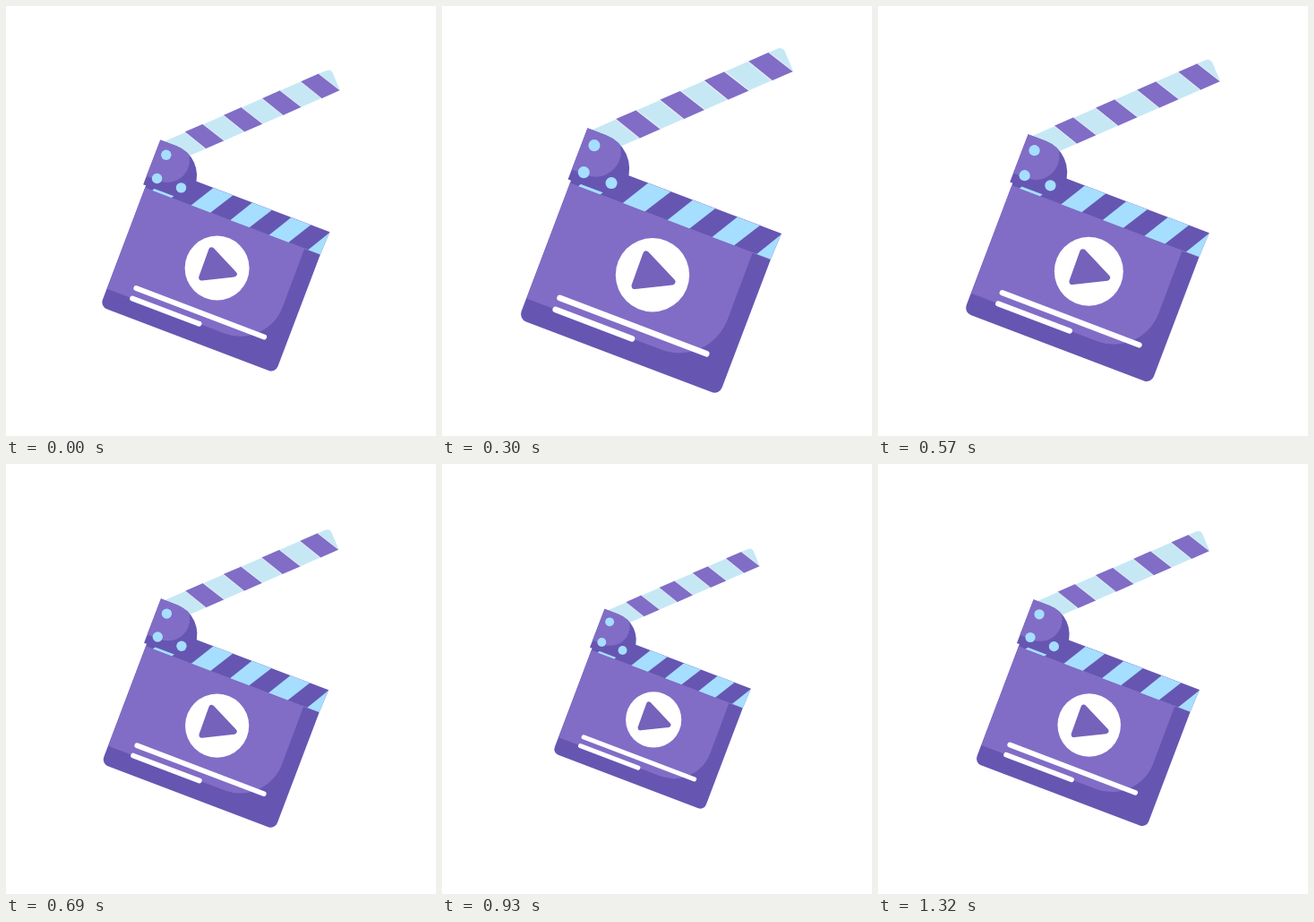
Animation of 480 by 480 pixels, one loop 1.35 s. Source, as an HTML page with a canvas:

```html
<!DOCTYPE html>
<html lang="en">
<head>
<meta charset="utf-8">
<title>Clapperboard</title>
<style>
html, body { margin: 0; width: 100%; height: 100%; overflow: hidden; background: #fff; }
canvas { display: block; width: 480px; height: 480px; }
</style>
</head>
<body>
<canvas id="stage" width="480" height="480"></canvas>
<script>
const ctx = document.getElementById('stage').getContext('2d');
const LOOP = 1350, STEP = 30;
const DRAWN_SCALE = 1.137; // the coordinates below are laid out at this scale
const PURPLE = '#816dc6', DARK = '#6656b2', BLUE = '#a6deff', PALE = '#c6e8f5';
const SLOPE = 0.38;

function fill(color) {
  ctx.fillStyle = color;
  ctx.fill();
}

// Each point is [x, y] or [x, y, cornerRadius].
function trace(points) {
  ctx.beginPath();
  points.forEach(([x, y, r], i) => {
    if (!r) return ctx.lineTo(x, y);
    const [nx, ny] = points[(i + 1) % points.length];
    ctx.arcTo(x, y, nx, ny, r);
  });
  ctx.closePath();
}

function shape(color, points) {
  trace(points);
  fill(color);
}

function disc(color, x, y, r) {
  ctx.beginPath();
  ctx.arc(x, y, r, 0, Math.PI * 2);
  fill(color);
}

function line(color, width, x1, y1, x2, y2) {
  ctx.strokeStyle = color;
  ctx.lineWidth = width;
  ctx.beginPath();
  ctx.moveTo(x1, y1);
  ctx.lineTo(x2, y2);
  ctx.stroke();
}

function drawArm() {
  shape(PALE, [[168, 139], [364, 53.1], [379.5, 46.5, 6], [391, 74], [190, 161.5]]);
  for (let i = 0; i < 4; i++) {
    const x = 49 * i, y = -21.3 * i;
    shape(PURPLE, [[194 + x, 127 + y], [217 + x, 117 + y], [244 + x, 138 + y], [220.5 + x, 148.3 + y]]);
    line('rgba(255,255,255,.8)', 1, 194 + x, 127 + y, 220.5 + x, 148.3 + y);
    line('rgba(255,255,255,.8)', 1, 217 + x, 117 + y, 244 + x, 138 + y);
  }
}

function drawStrip() {
  const top = x => 254 + (x - 378) * SLOPE;
  const bottom = x => 198 + (x - 143.5) * SLOPE;
  const strip = [[154.5, 169], [378, 254], [366, 282.7], [143.5, 198]];
  shape(DARK, strip);
  ctx.save();
  trace(strip);
  ctx.clip();
  for (let i = -1; i < 4; i++) {
    const t = 230.3 + 49.4 * i, b = 202 + 49.5 * i;
    shape(BLUE, [[t, top(t)], [t + 25, top(t + 25)], [b + 24.5, bottom(b + 24.5)], [b, bottom(b)]]);
  }
  ctx.restore();
}

function drawHinge() {
  const plate = [[163, 137], [221, 159, 40], [202, 209], [196, 214.5], [141.3, 193.7]];
  shape(DARK, plate);
  ctx.save();
  trace(plate);
  ctx.clip();
  ctx.beginPath();
  ctx.moveTo(163, 130);
  ctx.lineTo(140, 181);
  ctx.lineTo(162, 189.2);
  ctx.arc(172, 163, 28, 1.935, -0.35, true);
  ctx.lineTo(205, 130);
  fill(PURPLE);
  ctx.restore();
  disc(BLUE, 170.4, 156.2, 6.5);
  disc(BLUE, 158.8, 186, 6.5);
  disc(BLUE, 189.4, 197.8, 6.5);
}

function drawBoard() {
  shape(DARK, [[143.5, 198], [366, 282.7], [309, 433, 9], [86.5, 348.5, 9]]);
  shape(PURPLE, [[143.5, 198], [346, 275], [298, 403, 57], [95.5, 326]]);
}

function drawPlay() {
  disc('#fff', 235, 299.8, 40.9);
  const color = '#7562bb';
  shape(color, [[228, 277], [256.5, 307.3], [215.5, 311.8]]);
  ctx.strokeStyle = color;
  ctx.lineWidth = 7.5;
  ctx.stroke();
}

function draw(ms) {
  const scale = 1 + 0.147 * Math.sin(ms / LOOP * Math.PI * 2);
  ctx.setTransform(1, 0, 0, 1, 0, 0);
  ctx.fillStyle = '#fff';
  ctx.fillRect(0, 0, 480, 480);
  ctx.translate(240, 240);
  ctx.scale(scale / DRAWN_SCALE, scale / DRAWN_SCALE);
  ctx.translate(-240, -240);
  ctx.lineJoin = 'round';

  ctx.lineCap = 'butt';
  drawArm();
  drawBoard();
  drawStrip();
  drawHinge();
  drawPlay();
  ctx.lineCap = 'round';
  line('#fff', 6.6, 132.3, 325.3, 294.8, 387.2);
  line('#fff', 6.6, 127.5, 338.3, 212.2, 370.4);
}

const start = performance.now();
function tick() {
  const ms = (performance.now() - start) % LOOP;
  draw(Math.floor(ms / STEP) * STEP);
  requestAnimationFrame(tick);
}
tick();
</script>
</body>
</html>
```
